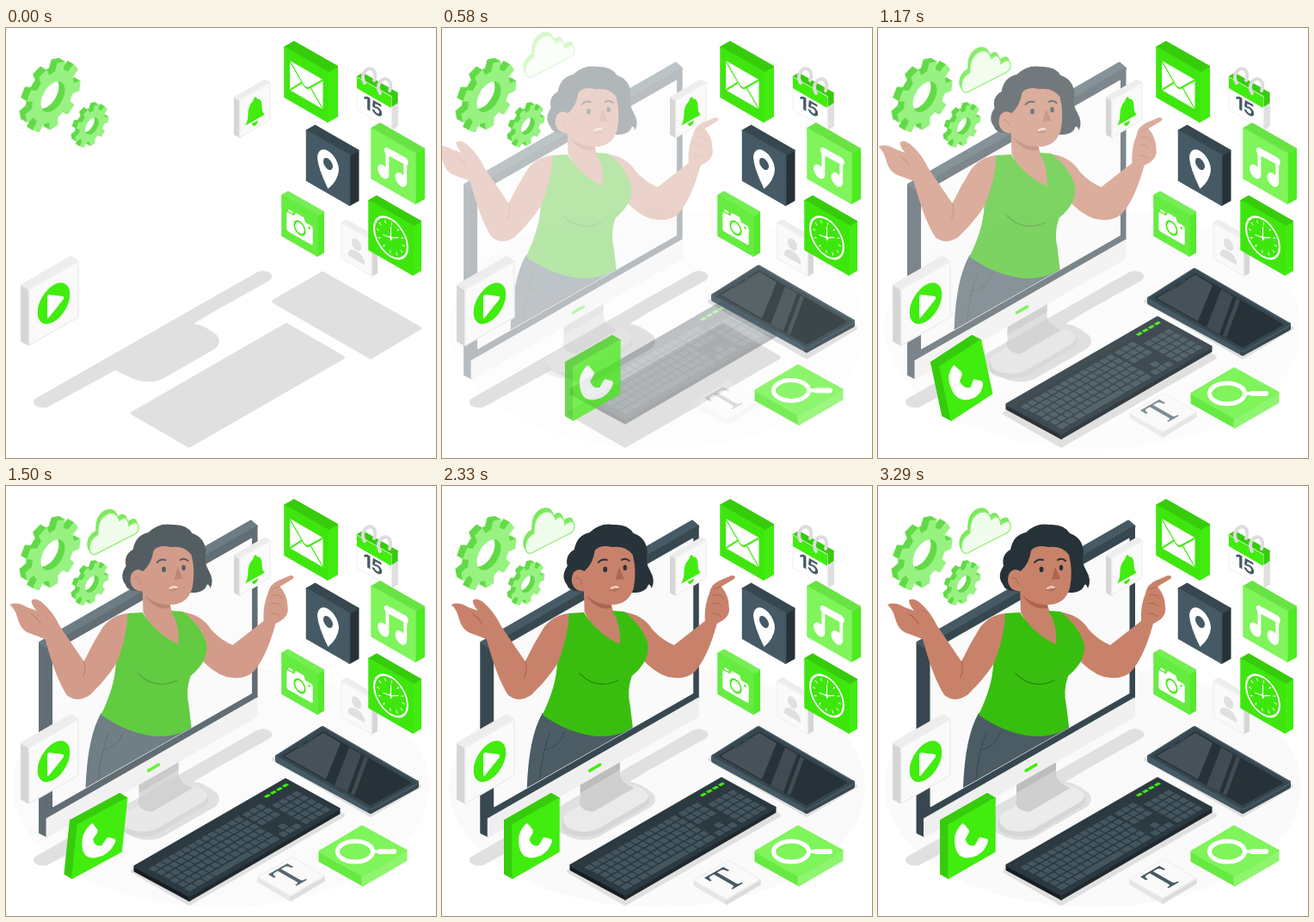
An HTML page that plays this animation: 500x500 px, repeating every 3.46 s.

```html
<!DOCTYPE html>
<html lang="en">
<head>
<meta charset="utf-8">
<title>Isometric video call</title>
<style>
html, body { margin: 0; width: 100%; height: 100%; overflow: hidden; background: #fff; }
svg { display: block; width: 100%; height: 100%; }
</style>
</head>
<body>
<svg id="stage" viewBox="0 0 500 500"></svg>
<script>
const LOOP = 3460;
const GREEN = '#40ed0e', LIGHT = '#7ff45b', SKIN = '#c8826a', SKIN_DARK = '#ab6450';
const SLATE = '#455a64', DARK = '#37474f', INK = '#263238', SHADOW = '#e0e0e0';

// Drawing helpers
const path = (d, fill, extra = '') => `<path d="${d}" fill="${fill}" ${extra}/>`;
const line = (d, color, width, extra = '') =>
  path(d, 'none', `stroke="${color}" stroke-width="${width}" stroke-linecap="round" stroke-linejoin="round" ${extra}`);
const poly = (points, fill, round = 1) =>
  `<polygon points="${points}" fill="${fill}" stroke="${fill}" stroke-width="${round}" stroke-linejoin="round"/>`;
const circle = (x, y, r, fill, extra = '') => `<circle cx="${x}" cy="${y}" r="${r}" fill="${fill}" ${extra}/>`;
const group = (transform, content) => `<g transform="${transform}">${content}</g>`;
const layer = (id, content) => `<g id="${id}">${content}</g>`;

// Upright block: (x, y) is the upper corner nearest the viewer, dir is where the front runs.
function tile(dir, x, y, w, h, d, [front, top, side], icon) {
  const k = 0.573, fx = x + dir * w, fy = y - k * w, bx = x - dir * d, by = y - k * d;
  const left = dir > 0 ? [x, y] : [fx, fy];
  return poly([x, y, bx, by, bx, by + h, x, y + h], side, 2)
    + poly([x, y, bx, by, bx + dir * w, by - k * w, fx, fy], top, 2)
    + poly([x, y, fx, fy, fx, fy + h, x, y + h], front, 1.5)
    + group(`matrix(${w / 100} ${-dir * k * w / 100} 0 ${h / 100} ${left})`, icon);
}

// Flat slab given by its left, top, right and bottom corners.
function slab([l, t, r, b], height, [top, leftSide, rightSide], round = 2) {
  const low = ([x, y]) => [x, y + height];
  return poly([l, b, low(b), low(l)], leftSide, round)
    + poly([r, b, low(b), low(r)], rightSide, round)
    + poly([l, t, r, b], top, round);
}

function gear(x, y, r, hole, teeth, depth) {
  const points = [];
  for (let i = 0; i < teeth; i++) {
    [[-0.3, 0.76], [-0.22, 1], [0.22, 1], [0.3, 0.76]].forEach(([a, s]) => {
      const angle = (i + a + 0.2) / teeth * 2 * Math.PI;
      points.push([Math.cos(angle) * r * s, Math.sin(angle) * r * s].map(v => v.toFixed(1)));
    });
  }
  const ring = `M${points.join('L')}ZM${hole} 0A${hole} ${hole} 0 1 0 ${-hole} 0A${hole} ${hole} 0 1 0 ${hole} 0Z`;
  let out = '';
  for (let d = depth; d >= 0; d--) {
    out += group(`matrix(.87 -.5 0 1 ${x - d} ${y - d * 0.57})`,
      path(ring, d ? '#62da48' : '#97f282', 'fill-rule="evenodd"'));
  }
  return out;
}

const bright = ['#3fe60e', '#36cc0c', GREEN];
const paper = ['#fafafa', '#ededed', '#d6d6d6'];
const outlined = '<rect width="100" height="100" rx="3" fill="none" stroke="#e6e6e6" stroke-width="1.5"/>';

function ground() {
  return layer('floor', '<ellipse cx="250" cy="350" rx="242" ry="140" fill="#fafafa"/>')
    + path('M34 431L292 284Q300 280 307 285Q313 290 304 295L243 329L218 344Q231 345 246 358Q251 366 243 373L182 408Q166 415 148 408L127 398L48 441Q39 443 33 438Q30 434 34 431Z', SHADOW)
    + poly('147,448 326,345 392,383 213,486', SHADOW, 4)
    + poly('311,318 368,285 481,349 424,383', SHADOW, 4);
}

function staticTiles() {
  const note = line('M36 72V24L77 23V68', '#fff', 7.5) + line('M36 28L77 27', '#fff', 14)
    + circle(27, 73, 13, '#fff') + circle(67, 69, 13, '#fff');
  const mail = '<rect x="12" y="21" width="77" height="59" rx="3" fill="#fff"/>'
    + line('M13 23L44 54Q50 59 56 54L88 23M14 78L40 51M87 78L60 51', GREEN, 3);
  const pin = path('M50 16A25 26 0 0 1 75 42Q73 64 50 92Q27 64 25 42A25 26 0 0 1 50 16Z', '#fff') + circle(50, 42, 11, SLATE);
  const camera = path('M18 34H34L39 24H61L66 34H82Q87 34 87 39V76Q87 81 82 81H18Q13 81 13 76V39Q13 34 18 34Z', '#fff')
    + circle(50, 56, 15, 'none', `stroke="${GREEN}" stroke-width="4.5"`) + circle(77, 42, 3, GREEN) + line('M20 28H28', '#fff', 5);
  const user = outlined + circle(50, 36, 16, SHADOW) + path('M22 80Q22 55 50 55Q78 55 78 80Z', SHADOW);
  const clock = circle(50, 50, 38, 'none', 'stroke="#fff" stroke-width="4"')
    + circle(50, 50, 29, 'none', `stroke="#fff" stroke-width="6" stroke-dasharray="2 ${(58 * Math.PI / 12 - 2).toFixed(2)}"`)
    + line('M50 55V28M50 50L67 41M50 50L33 53', '#fff', 2) + circle(50, 50, 3.5, '#fff');
  const bell = outlined + path('M50 15Q56 15 56 22Q73 28 73 50Q73 68 82 77H18Q27 68 27 50Q27 28 44 22Q44 15 50 15Z', GREEN)
    + path('M40 82H60Q59 92 50 92Q41 92 40 82Z', GREEN);
  const play = outlined + circle(50, 50, 33, GREEN) + path('M37 32Q37 28 41 30L69 47Q72 50 69 53L41 70Q37 72 37 68Z', '#fff');
  const calendar = outlined + `<rect width="100" height="34" fill="${GREEN}"/>`
    + `<text x="47" y="81" font-family="Inter, sans-serif" font-weight="700" font-size="54" text-anchor="middle" fill="${SLATE}">15</text>`;
  const loop = (x, y) => line(`M${x - 6} ${y + 7}C${x - 12} ${y - 4} ${x - 2} ${y - 14} ${x + 4} ${y - 8}Q${x + 8} ${y - 4} ${x + 5} ${y + 4}`, '#dcdcdc', 4);
  return tile(-1, 374, 51, 50, 58, 11, bright, mail)
    + tile(-1, 448, 80, 40, 38, 7, ['#fff', '#36cc0c', '#e0e0e0'], calendar)
    + poly('449,80 455,76 455,87 449,91', '#36cc0c') + loop(423, 57) + loop(441, 69)
    + tile(-1, 476, 146, 51, 58, 10, [LIGHT, '#68e344', '#4cec20'], note)
    + tile(-1, 399.5, 148, 50, 58, 10, [SLATE, DARK, INK], pin)
    + tile(-1, 362, 218, 41, 47, 7, ['#66ec41', '#74ee53', '#54ea2b'], camera)
    + tile(-1, 425, 247, 35, 41, 6, paper, user)
    + tile(-1, 473, 230, 51, 57, 9, bright, clock)
    + tile(1, 272, 84, 35, 43, 6, paper, bell)
    + tile(1, 27, 304, 57, 65, 9, paper, play);
}

function cloud() {
  const shape = 'M104 78Q97 80 97 69Q98 60 107 55Q106 37 118 31Q128 27 132 39Q138 32 142 40L143 45Q153 37 154 46Q155 53 147 56Z';
  return group('translate(-2 -4)', path(shape, '#7be95d', 'stroke="#7be95d" stroke-width="1.5"'))
    + path(shape, '#f1fdec', 'stroke="#8cf06f" stroke-width="1.3"');
}

function monitor() {
  const stand = path('M140 390Q140 384 149 378L205 346L231 354Q247 362 239 371L184 404Q164 412 144 403Q139 399 140 390Z', '#d6d6d6')
    + path('M141 386Q142 381 151 377L207 345L231 351Q246 359 236 367L181 399Q165 405 149 399Q141 394 141 386Z', '#ebebeb')
    + path('M161 345L207 318V336Q209 346 224 351L176 379Q157 377 161 363Z', '#cfcfcf')
    + path('M161 345L207 318V330L161 357Z', '#bdbdbd');
  return stand
    + poly('46,183 54,187 54,407 46,403', DARK, 3)
    + poly('46,182 54,187 298,47 291,41', SLATE, 3)
    + poly('54,188 298,47 298,246 54,386', DARK, 2)
    + poly('54,387 298,247 298,268 54,408', '#efefef', 2)
    + poly('61,193 292,61 292,241 61,373', '#fafafa')
    + line('M172 331L184 324', GREEN, 3.5);
}

function woman() {
  const pants = path('M117 264L219 274L222 281L99 351Q101 292 117 264Z', '#4b5c65')
    + line('M143 286Q137 304 119 307M126 286Q116 312 114 341', DARK, 1);
  const leftArm = path('M149 148Q131 149 119 164Q107 183 97 204L69 163Q61 146 48 135Q40 129 36 133Q36 138 42 145L31 141Q19 134 11 138Q17 143 20 154Q24 169 36 172L52 178Q64 223 77 243Q89 253 104 243Q130 219 148 184Z', SKIN)
    + line('M97 204Q100 213 96 222M36 149Q44 154 47 161', SKIN_DARK, 1.2);
  const rightArm = path('M209 146Q234 149 245 167Q256 179 270 185L306 157Q305 139 311 125Q313 114 323 110L337 104Q343 104 340 108L325 117Q334 127 334 141Q336 153 320 160Q309 200 294 216Q284 226 263 222Q246 217 229 197Z', SKIN)
    + line('M316 127Q324 125 328 131M314 137Q322 134 326 140M324 117L316 120M314 148Q322 148 325 152', SKIN_DARK, 1);
  const hairBack = path('M164 122Q148 124 145 114Q138 105 146 93Q143 80 154 74Q157 57 172 54Q184 42 200 45Q216 44 223 55Q238 60 239 77Q236 88 242 98Q249 110 244 119Q242 113 240 115Q237 125 220 124Z', INK);
  const neck = path('M165 118L166 147Q181 176 207 186Q212 162 199 145L196 133Z', SKIN)
    + path('M168 127Q181 139 197 138V142Q179 145 168 127Z', SKIN_DARK);
  const shirt = path('M148 148L165 147Q182 173 207 184Q209 162 198 145L212 146Q231 160 239 181Q244 202 221 221Q215 238 219 255L222 280Q207 292 179 291Q146 287 117 266Q133 233 134 208Q147 177 148 148Z', '#38be0f')
    + line('M160 218Q180 238 205 226', '#278a09', 1.3);
  const face = path('M166 99Q176 90 178 75Q184 68 198 71Q214 69 222 80Q227 99 223 119Q217 138 198 138Q178 137 168 122Q153 124 151 110Q151 98 160 97Z', SKIN)
    + line('M156 107Q161 105 163 114', SKIN_DARK, 1)
    + path('M206 94L212 108L202 109Z', SKIN_DARK)
    + line('M182 89Q186 84 192 86M209 86Q214 83 218 87', INK, 2)
    + '<ellipse cx="190" cy="97" rx="2.4" ry="3.3" fill="#263238"/><ellipse cx="213" cy="95" rx="2.2" ry="3.2" fill="#263238"/>'
    + line('M197 119Q201 116 205 118', '#f3dcd2', 2) + line('M196 121Q202 123 206 119', SKIN_DARK, 1.2);
  return pants + hairBack + leftArm + rightArm + neck + shirt + face;
}

function keyboard() {
  let keys = '';
  const key = (u, v, w, h = 10.5) => { keys += `<rect x="${u}" y="${v}" width="${w}" height="${h}" rx="1" fill="#43565f"/>`; };
  for (let row = 0; row < 6; row++) {
    const v = 16 + row * 13.2;
    if (row < 5) for (let i = 0; i < 14; i++) key(3 + i * 4.35 + row % 3 * 0.35, v, 3.6);
    else [[3, 5], [8.7, 5], [14.4, 5], [20.1, 25], [45.8, 5], [51.5, 5], [57.2, 6]].forEach(([u, w]) => key(u, v, w));
    for (let i = 0; i < 3; i++) {
      if (row < 3 || row === 5 || (row === 4 && i === 1)) key(65.3 + i * 4.4, v, 3.7);
    }
    if (row) for (let i = 0; i < 4; i++) key(80.3 + i * 4.35, v, 3.6);
  }
  for (let i = 0; i < 4; i++) keys += `<rect x="${83 + i * 4}" y="7" width="3" height="5" fill="${GREEN}"/>`;
  return slab([[150, 441], [325, 340], [387, 374], [213, 475]], 5, ['#2c3940', '#171e22', '#1f292e'], 3)
    + group('matrix(1.75 -1.01 .63 .345 150 441)', keys);
}

function phone() {
  return slab([[316, 315], [368, 282], [477, 345], [424, 374]], 4, [SLATE, SLATE, DARK], 6)
    + poly('317,314 368,282 476,345 424,374', DARK, 3)
    + poly('324,314 369,287 469,345 424,370', INK, 3)
    + path('M324 314L369 287L389 299L372 341Z', '#475258')
    + path('M399 304L413 312L397 356L382 348ZM417 314L421 317L405 360L401 358Z', '#414c52')
    + line('M341 303L355 295', DARK, 4) + line('M346 300L351 297', INK, 1.3);
}

function letterTile() {
  return slab([[293, 457], [333, 434], [370, 456], [331, 479]], 6, ['#fafafa', '#e6e6e6', '#dcdcdc'], 1.5)
    + line('M293 457L333 434L370 456L331 479Z', '#e8e8e8', 0.8)
    + group('matrix(.87 -.5 .87 .5 330 456)',
      `<text y="16" font-family="'Noto Serif', serif" font-weight="500" font-size="45" text-anchor="middle" fill="${SLATE}">T</text>`);
}

function searchTile() {
  return slab([[365, 425], [414, 396], [465, 424], [415, 453]], 11, [LIGHT, '#66ea42', '#8ff56f'], 3)
    + '<ellipse cx="406" cy="425" rx="20.5" ry="12" fill="none" stroke="#fff" stroke-width="5"/>'
    + line('M427 425H433', '#fff', 4) + line('M435 425H451', '#fff', 6);
}

function callTile() {
  const handset = path('M32 13Q28 11 21 17Q13 23 13 36Q15 82 62 88Q80 88 85 74Q86 70 82 67L69 58Q66 56 62 61L56 67Q40 61 36 45L43 38Q46 34 43 30Z', '#fff');
  return tile(1, 82, 394, 54, 62, 9, [GREEN, '#36cc0c', '#36cc0c'], handset);
}

document.getElementById('stage').innerHTML = ground()
  + gear(54.5, 80, 37, 16, 9, 7) + gear(100, 114, 22.5, 9, 9, 5)
  + layer('cloud', cloud()) + layer('monitor', monitor() + woman())
  + staticTiles()
  + layer('keyboard', keyboard()) + layer('phone', phone())
  + layer('letter', letterTile()) + layer('search', searchTile()) + layer('call', callTile());

// Motion
function bezier(x1, y1, x2, y2) {
  const at = (a, b, s) => 3 * (1 - s) * (1 - s) * s * a + 3 * (1 - s) * s * s * b + s ** 3;
  return x => {
    if (x >= 1) return 1;
    let low = 0, high = 1;
    for (let i = 0; i < 24; i++) {
      const mid = (low + high) / 2;
      if (at(x1, x2, mid) < x) low = mid; else high = mid;
    }
    return at(y1, y2, low);
  };
}
const spring = bezier(0.36, -0.01, 0.5, 1.38);
const easeOut = bezier(0, 0, 0.58, 1);
const mix = (a, b, p) => a + (b - a) * p;

function place(id, transform, opacity) {
  const node = document.getElementById(id);
  node.setAttribute('transform', transform);
  node.setAttribute('opacity', Math.max(0, Math.min(1, opacity)));
}

const drops = { phone: 1000, search: 1000, keyboard: 2000, cloud: 2000, letter: 2500 };

// The call tile rushes in leaning, swings past upright and settles.
function placeCall(t) {
  const enter = spring(t / 1200);
  let lean = mix(-0.5, 0.2, enter), shift = mix(255, -3, enter);
  if (t > 1200) {
    const back = spring((t - 1200) / 400), settle = spring(Math.max(0, t - 1600) / 400);
    lean = mix(mix(0.2, -0.09, back), 0, settle);
    shift = mix(-3, 0, back);
  }
  place('call', `matrix(1 0 ${lean} 1 ${shift - lean * 406} 0)`, enter);
}

function draw(t) {
  for (const id in drops) {
    const p = spring(t / drops[id]);
    place(id, `translate(0 ${-30 * (1 - p)})`, p);
  }
  const p = easeOut(t / 2500);
  place('monitor', `translate(${-30 * (1 - p)} 0)`, p);
  place('floor', '', p);
  placeCall(t);
}

const start = performance.now();
function tick() {
  draw((performance.now() - start) % LOOP);
  requestAnimationFrame(tick);
}
tick();
</script>
</body>
</html>
```
